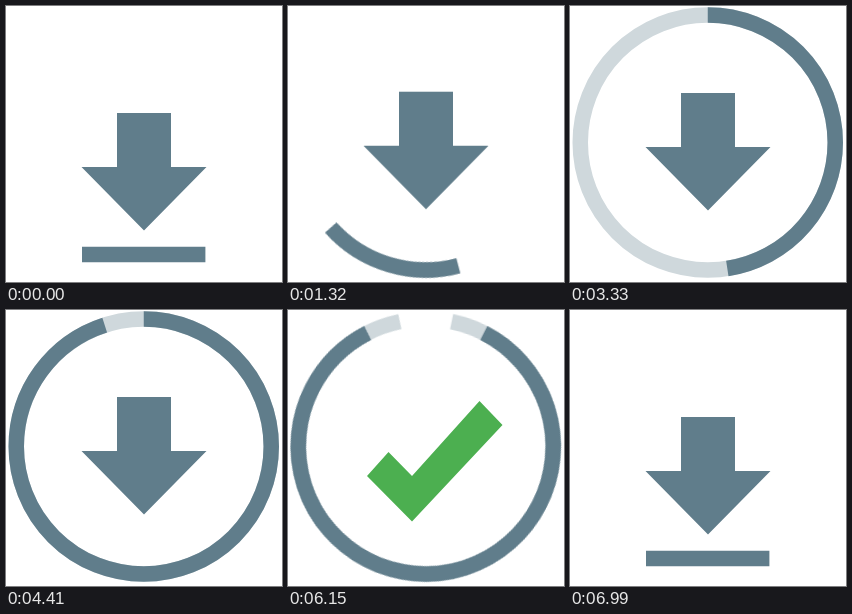
These frames come from a looping animation (276 px wide and 276 px high, 7.35 s). An HTML page:

```html
<!DOCTYPE html>
<html lang="en">
<head>
<meta charset="utf-8">
<title>Download</title>
<style>
  html, body { margin: 0; width: 100%; height: 100%; overflow: hidden; background: #fff; }
  svg { display: block; width: 100vw; height: 100vh; }
  svg * { animation: 7350ms linear infinite; }

  .slate { fill: #607d8b; }
  .green { fill: #4caf50; }
  .line { fill: none; stroke: #607d8b; stroke-width: 15.5; }
  .ring { transform-origin: 137.75px 136.5px; }
  .track { stroke: #cfd8dc; animation-name: track; }
  .progress { animation-name: progress; }
  .bar { animation-name: bend, swap; }
  .arrow { animation-name: arrow; }
  .check { animation-name: check; }

  /* Dips onto the bar, springs up, later falls out and drops in again */
  @keyframes arrow {
    0%, 6.122% { transform: translateY(0); animation-timing-function: cubic-bezier(.5, 0, .6, 1); }
    9.796% { transform: translateY(33px); animation-timing-function: cubic-bezier(.4, 0, .3, 1); }
    13.605% { transform: translateY(-50px); animation-timing-function: cubic-bezier(.45, 0, .5, .95); }
    17.959% { transform: translateY(-21.3px); animation-timing-function: ease-out; }
    19.048% { transform: translateY(-20px); }
    62.517% { transform: translateY(-20px); animation-timing-function: cubic-bezier(.65, 0, .35, 1); }
    73.061% { transform: translateY(217px); }
    73.07%, 84.082% { transform: translateY(-237px); animation-timing-function: cubic-bezier(.5, 0, .35, 1); }
    88.98%, 100% { transform: translateY(0); }
  }

  @keyframes check {
    0%, 62.517% { transform: translateY(-237px); animation-timing-function: cubic-bezier(.65, 0, .35, 1); }
    73.061% { transform: translateY(0); }
    84.082% { transform: translateY(0); animation-timing-function: cubic-bezier(.5, 0, .35, 1); }
    88.98% { transform: translateY(237px); }
    88.99%, 100% { transform: translateY(-237px); }
  }

  /* The bar ends stay put while its middle sags into the ring's curve */
  @keyframes bend {
    0%, 7.5% { d: path("M76 248.5C114.4 248.5 161.1 248.5 199.4 248.5"); animation-timing-function: ease-in-out; }
    9.796% { d: path("M76 248.2C114.4 274 161.1 274 199.4 248.2"); animation-timing-function: ease-in-out; }
    12.245%, 89.388% { d: path("M76 248.1C114.4 269.4 161.1 269.4 199.4 248.1"); animation-timing-function: ease-in-out; }
    91.429% { d: path("M76 248.5C114.4 241 161.1 241 199.4 248.5"); animation-timing-function: ease-in-out; }
    93.061% { d: path("M76 248.5C114.4 252 161.1 252 199.4 248.5"); animation-timing-function: ease-in-out; }
    95.102%, 100% { d: path("M76 248.5C114.4 248.5 161.1 248.5 199.4 248.5"); }
  }
  @keyframes swap {
    0%, 14.694% { opacity: 1; }
    14.7%, 89.38% { opacity: 0; }
    89.388%, 100% { opacity: 1; }
  }

  /* Rotation places the start of the stroke, the dash sets its length in degrees */
  @keyframes progress {
    0%, 14.688% { transform: rotate(151.1deg); stroke-dasharray: 0 400; }
    14.694% { transform: rotate(151.1deg); stroke-dasharray: 57.8 400; animation-timing-function: cubic-bezier(.6, 0, .85, .45); }
    17.959% { transform: rotate(165deg); stroke-dasharray: 63 400; animation-timing-function: cubic-bezier(.35, .23, .35, 1); }
    26.122% { transform: rotate(363.7deg); stroke-dasharray: 1.8 400; }
    26.939%, 30.612% { transform: rotate(360deg); stroke-dasharray: 0 400; }
    61.633%, 79.586% { transform: rotate(360deg); stroke-dasharray: 361 400; }
    79.592% { transform: rotate(0deg); stroke-dasharray: 360 400; animation-timing-function: cubic-bezier(.33, 0, .67, .33); }
    83.673% { transform: rotate(26.9deg); stroke-dasharray: 306.2 400; animation-timing-function: cubic-bezier(.3, .17, .4, 1); }
    88.98%, 89.388% { transform: rotate(151.1deg); stroke-dasharray: 57.8 400; }
    89.394%, 100% { transform: rotate(151.1deg); stroke-dasharray: 0 400; }
  }

  @keyframes track {
    0%, 17.953% { transform: rotate(165deg); stroke-dasharray: 0 400; }
    17.959% { transform: rotate(165deg); stroke-dasharray: 60 400; animation-timing-function: cubic-bezier(.35, .23, .35, 1); }
    26.122% { transform: rotate(363.7deg); stroke-dasharray: 351.7 400; }
    26.939%, 80.402% { transform: rotate(360deg); stroke-dasharray: 361 400; }
    80.408% { transform: rotate(0deg); stroke-dasharray: 360 400; animation-timing-function: cubic-bezier(.33, 0, .67, .33); }
    83.673% { transform: rotate(11.5deg); stroke-dasharray: 337 400; animation-timing-function: cubic-bezier(.3, .17, .4, 1); }
    88.98% { transform: rotate(151.1deg); stroke-dasharray: 57.8 400; }
    88.99%, 100% { transform: rotate(165deg); stroke-dasharray: 0 400; }
  }
</style>
</head>
<body>
<svg viewBox="0 0 276 276">
  <defs>
    <clipPath id="inside"><circle cx="137.75" cy="136.5" r="127"/></clipPath>
    <path id="circle" pathLength="360" d="M137.75 9a127.5 127.5 0 0 1 0 255a127.5 127.5 0 0 1 0-255"/>
  </defs>
  <g clip-path="url(#inside)">
    <path class="slate arrow" d="M111 107H165V161H200.5L138 224.5L75.5 161H111Z"/>
    <path class="green check" d="M79 166L100.5 142L124 166L191.5 91L214.5 115L124 211.5Z"/>
  </g>
  <use class="line ring track" href="#circle"/>
  <use class="line ring progress" href="#circle"/>
  <path class="line bar" d="M76 248.5C114.4 248.5 161.1 248.5 199.4 248.5"/>
</svg>
</body>
</html>
```
